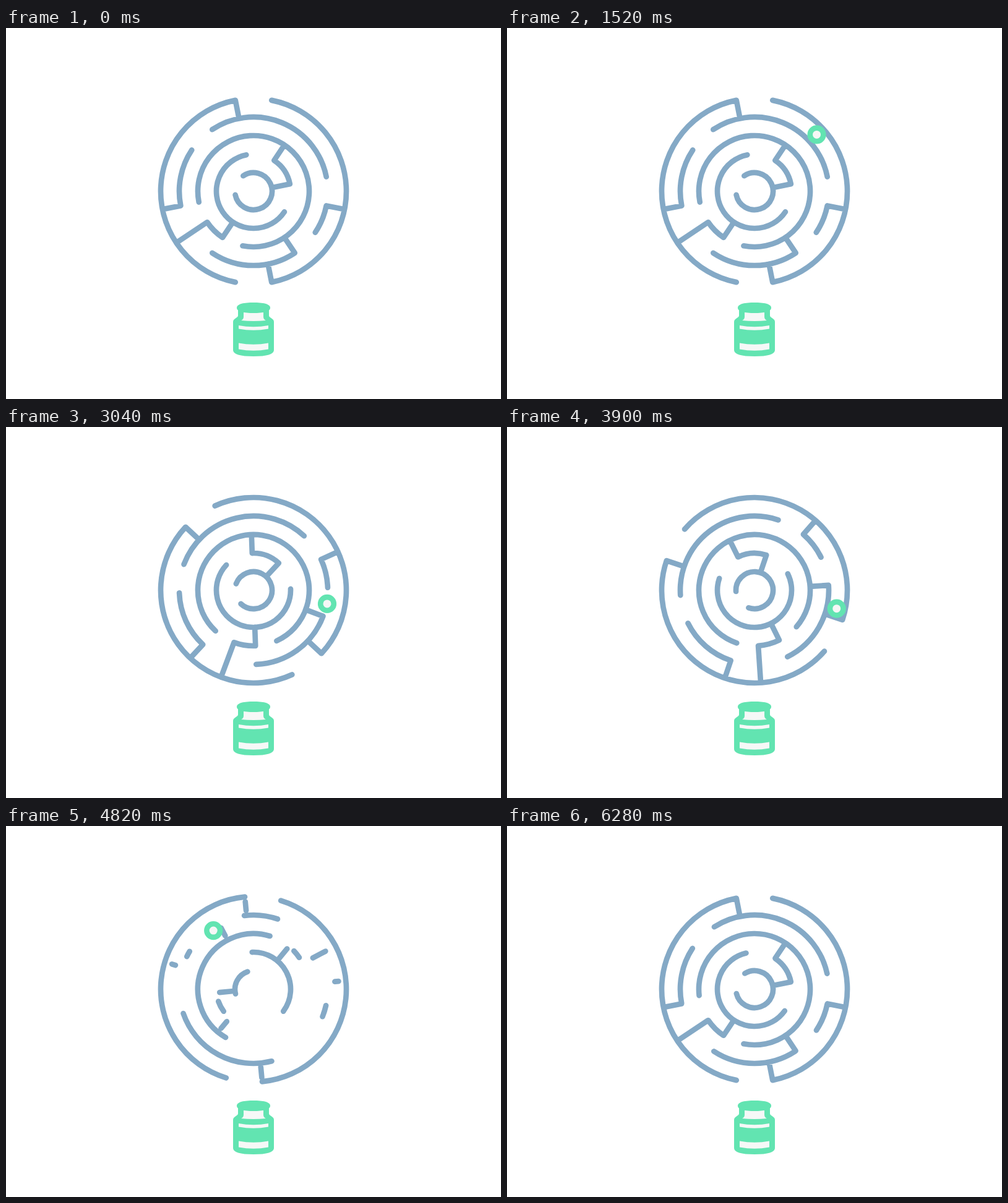
Animation of 800 by 600 pixels, one loop 6300 ms. Source, as an HTML page:

```html
<!DOCTYPE html>
<html lang="en">
<head>
<meta charset="utf-8">
<title>Maze</title>
<style>
  html, body { margin: 0; width: 100%; height: 100%; overflow: hidden; background: #fff; }
  svg { display: block; width: 800px; height: 600px; }
</style>
</head>
<body>
<svg viewBox="0 0 800 600">
  <path id="maze" fill="none" stroke="#84a9c6" stroke-width="8.7" stroke-linecap="round"/>
  <circle id="ball" r="10.8" fill="#f5f7f6" stroke="#62e4b1" stroke-width="8.6"/>
  <g fill="#62e4b1">
    <path d="M375 453V465Q375 467 373 468L369 471Q367 472.500 367 475V521Q367 531 400 531T433 521V475Q433 472.500 431 471L427 468Q425 467 425 465V453Z"/>
    <g fill="#f6f8f7">
      <path d="M384 457H416V467Q416 471 420 473Q400 475 380 473Q384 471 384 467Z"/>
      <path d="M376 481Q400 485.500 424 481V486.500Q400 491 376 486.500Z"/>
      <path d="M376 509.500Q400 514 424 509.500V519.500Q400 524 376 519.500Z"/>
    </g>
    <path d="M373 452.500C373 446 385 444 400 444S427 446 427 452.500 415 461 400 461 373 459 373 452.500Z"/>
  </g>
</svg>
<script>
const LOOP = 6300, CX = 400, CY = 264;
const RING = 30, STEP = 11.25;             // the maze grid: radius and angle units
const OUTER = 136, INNER = 105;            // the two lanes the ball rolls in
const LAND = 853, EXIT = 5770;             // ball enters and leaves the maze
const REGROW = 5780, REGROWN = 6330;

const clamp = v => Math.max(0, Math.min(1, v));
const phase = (t, from, to) => clamp((t - from) / (to - from));
const easeInOut = (p, n) => p < .5 ? Math.pow(2 * p, n) / 2 : 1 - Math.pow(2 - 2 * p, n) / 2;
const mix = (a, b, p) => a + (b - a) * p;

function point(r, deg) {
  const a = deg * Math.PI / 180;
  return [CX + r * Math.cos(a), CY + r * Math.sin(a)];
}
const text = (r, deg) => point(r, deg).map(v => v.toFixed(2)).join(' ');

function arcPath(r, from, to) {
  return `M${text(r, from)}A${r} ${r} 0 ${to - from > 180 ? 1 : 0} 1 ${text(r, to)}`;
}

// A wall draws the share k of itself; `anchor` is the point it shrinks towards.
const arc = (ring, a, b, anchor = .5) => (k, turn) => {
  const cut = (b - a) * (1 - k);
  return arcPath(ring * RING, (a + cut * anchor) * STEP + turn, (b - cut * (1 - anchor)) * STEP + turn);
};
const spoke = (a, r0, r1) => (k, turn) => {
  const cut = (r1 - r0) * (1 - k) / 2, deg = a * STEP + turn;
  return `M${text((r0 + cut) * RING, deg)}L${text((r1 - cut) * RING, deg)}`;
};

// Inner walls in the waves in which they shrink away.
const waves = [
  [arc(4, 15, 19), spoke(15, 4, 5), arc(4, 1, 3), spoke(1, 4, 5)],
  [arc(1, 21, 47)],
  [arc(4, 5, 11), arc(3, 11, 13), arc(2, 27, 31), spoke(13, 3, 5)],
  [spoke(5, 3, 4), spoke(7, 4, 5), spoke(27, 2, 3)],
  [arc(2, 3, 23), arc(3, 15, 41, 1), spoke(23, 4, 5)],
  [spoke(11, 2, 3), spoke(31, 1, 2)],
  [arc(4, 21, 31)]
];

function visible(t, wave) {
  if (t >= REGROW) return easeInOut(phase(t, REGROW, REGROWN), 2);
  const begin = 4372 + 52 * wave;
  return 1 - phase(t, begin, begin + 560);
}

function rotation(t) {
  if (t >= REGROW) return 0;               // the outer ring looks the same half a turn on
  const tilt = 1 - Math.pow(1 - phase(t, 1690, 3040) ** 2, 6.5);
  return -35.8 * tilt - 144.2 * easeInOut(phase(t, 3164, 5279), 3);
}

function mazePath(t, turn) {
  let d = arcPath(5 * RING, -7 * STEP + turn, 7 * STEP + turn)
    + arcPath(5 * RING, 9 * STEP + turn, 23 * STEP + turn);
  waves.forEach((walls, wave) => {
    const k = visible(t, wave);
    if (k > 0) d += walls.map(wall => wall(k, turn)).join('');
  });
  return d;
}

// Ball angle relative to the maze: in, on to the pocket, then all the way back.
function ballAngle(t) {
  const entry = Math.min(2.5, -88.2 + 1.031e-4 * (t - LAND) ** 2);
  if (t < 2219) return t < 1900 ? entry : 2.5;
  if (t < 4249) return mix(2.5, 72.7, easeInOut(phase(t, 2219, 3670), 2));
  return mix(72.7, -90, phase(t, 4249, EXIT) ** 2);
}

function ballRadius(t) {
  const hop = mid => easeInOut(phase(t, mid - 120, mid + 120), 2);
  return mix(OUTER, INNER, hop(2350) - hop(3038) + hop(4796) - hop(5230));
}

function ballPose(t, turn) {
  if (t < LAND) {
    const size = 1 - Math.pow(1 - phase(t, 0, 200), 3);
    return [404.3, mix(66, 127, phase(t, 192, LAND) ** 2), size];
  }
  if (t < EXIT) return [...point(ballRadius(t), ballAngle(t) + turn), 1];
  return [CX, mix(400, 480, phase(t, EXIT, 6030) ** 1.5), 1];
}

const maze = document.getElementById('maze');
const ball = document.getElementById('ball');

function draw(t) {
  const turn = rotation(t);
  maze.setAttribute('d', mazePath(t, turn));
  const [x, y, size] = ballPose(t, turn);
  ball.setAttribute('transform', `translate(${x.toFixed(2)} ${y.toFixed(2)}) scale(${size.toFixed(3)})`);
}

let start;
function frame(now) {
  if (start === undefined) start = now;
  draw((now - start) % LOOP);
  requestAnimationFrame(frame);
}
draw(0);
requestAnimationFrame(frame);
</script>
</body>
</html>
```
